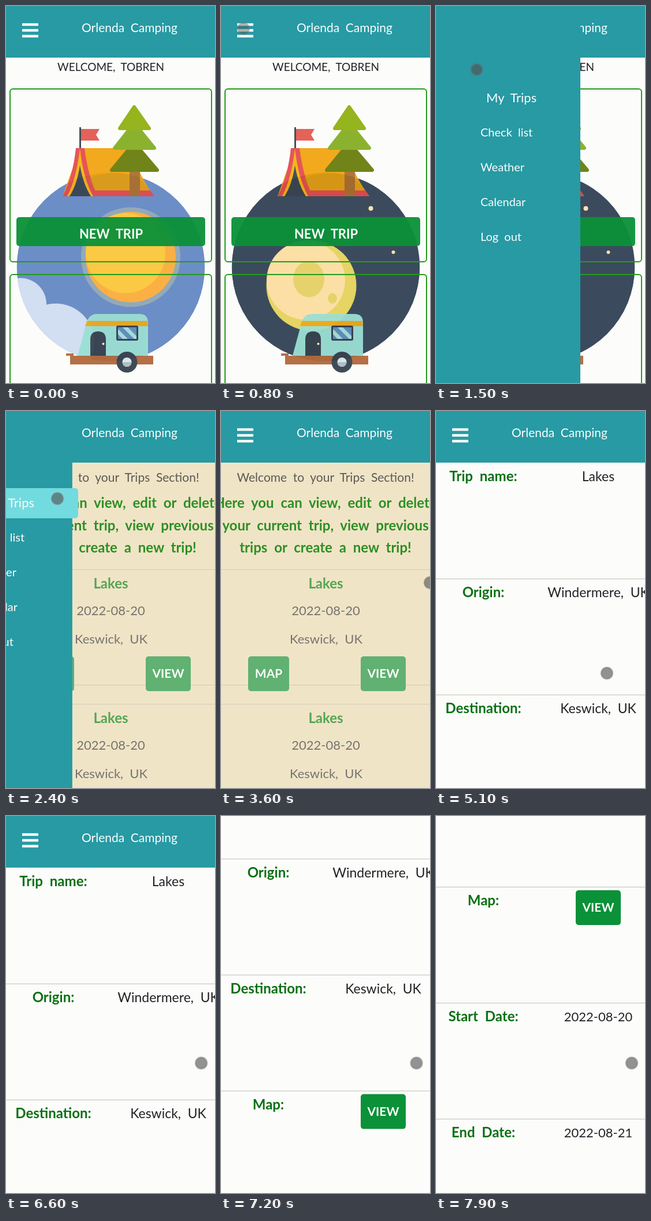
An HTML page for the animation above (8 s loop, 362 by 650 pixels).

```html
<!DOCTYPE html>
<html lang="en">
<head>
<meta charset="utf-8">
<title>Camping planner</title>
<style>
html, body { margin: 0; width: 100%; height: 100%; overflow: hidden; background: #fcfcfb; }
svg { display: block; width: 362px; height: 650px; }
text { font: 22px Lato, "Open Sans", sans-serif; word-spacing: .25em; text-anchor: middle; }
.bold { font-weight: 700; font-size: 24px; }
.label { fill: #0a7012; }
.value { font-size: 23px; fill: #222226; }
.button { font-weight: 700; font-size: 21px; fill: #fcfcfb; }
.side text { text-anchor: start; font-size: 20px; fill: #fcfcfb; }
.side .shift text { font-size: 22px; }

.anim, .anim * { animation: 8s linear infinite; }
.home { animation-name: home; }
.trips { animation-name: trips; }
.detail { animation-name: detail; }
.scroll { animation-name: scroll; }
.side { animation-name: side; }
.hover { animation-name: hover; }
.shift { animation-name: shift; }
.sky { animation-name: sky; }
.orb { animation-name: orb; }
.day { animation-name: day; }
.night { animation-name: night; }
.cloud { animation-name: cloud; }
.pointer { animation-name: move; }
.dot { animation-name: dot; }

/* Pages switch without a fade */
@keyframes home { 0%, 26.24% { visibility: visible } 26.25%, 100% { visibility: hidden } }
@keyframes trips { 0%, 26.24% { visibility: hidden } 26.25%, 58.74% { visibility: visible } 58.75%, 100% { visibility: hidden } }
@keyframes detail { 0%, 58.74% { visibility: hidden } 58.75%, 100% { visibility: visible } }
@keyframes scroll {
  0%, 84% { transform: none; animation-timing-function: ease-in-out }
  98%, 100% { transform: translateY(-567px) }
}
@keyframes side {
  0%, 12.5% { transform: translateX(-270px); animation-timing-function: ease-out }
  17.5%, 27.5% { transform: none; animation-timing-function: ease-in }
  30% { transform: translateX(-134px); animation-timing-function: ease-out }
  32.5%, 100% { transform: translateX(-270px) }
}
@keyframes hover { 0%, 21% { opacity: 0 } 23%, 100% { opacity: 1 } }
@keyframes shift { 0%, 21% { transform: none } 23%, 100% { transform: translateX(10px) } }
@keyframes sky { 0%, 1.25% { fill: #6c8ec6 } 8.75%, 100% { fill: #3b4b5d } }
@keyframes orb {
  0%, 1.25% { transform: translate(60px, -49px); animation-timing-function: ease-in-out }
  9%, 100% { transform: none }
}
@keyframes day { 0%, 2.5% { opacity: 1 } 8%, 100% { opacity: 0 } }
@keyframes night { 0%, 2.5% { opacity: 0 } 8%, 100% { opacity: 1 } }
@keyframes cloud {
  0% { transform: none; animation-timing-function: ease-in }
  8%, 100% { transform: translate(-150px, 40px) }
}
@keyframes move {
  0%, 13% { transform: translate(39px, 39px); animation-timing-function: ease-in-out }
  23%, 32.5% { transform: translate(89px, 151px); animation-timing-function: ease-in-out }
  45% { transform: translate(362px, 296px); animation-timing-function: ease-in-out }
  54%, 59% { transform: translate(283px, 452px) }
  63.75%, 67% { transform: translate(296px, 452px); animation-timing-function: ease-in-out }
  80% { transform: translate(338px, 426px) }
  100% { transform: translate(339px, 426px) }
}
@keyframes dot { 0%, 7% { opacity: 0 } 10% { opacity: .7 } 12%, 100% { opacity: 1 } }
</style>
</head>
<body>
<svg class="anim" viewBox="0 0 362 650">
  <defs>
    <clipPath id="disc"><circle cx="181.500" cy="450" r="163"/></clipPath>
    <g id="trip">
      <text class="bold" x="181.500" y="306" fill="#54a554">Lakes</text>
      <g fill="#747470">
        <text x="181.500" y="352">2022-08-20</text>
        <text x="182" y="401">Keswick, UK</text>
      </g>
    </g>
    <rect id="view" x="242" width="78" height="60" rx="5"/>
  </defs>

  <g class="home">
    <rect width="362" height="650" fill="#fcfcfb"/>
    <text x="181.500" y="112" style="font-size:19px" fill="#222226">WELCOME, TOBREN</text>

    <g clip-path="url(#disc)">
      <circle class="sky" cx="181.500" cy="450" r="163"/>
      <g class="night" fill="#fbe3ae">
        <circle cx="259.500" cy="349" r="4"/>
        <circle cx="298.500" cy="424.500" r="3"/>
      </g>
      <g class="orb">
        <g class="day">
          <circle cx="156" cy="482" r="86" fill="#94a9b8"/>
          <circle cx="156" cy="482" r="78" fill="#fbb044"/>
          <circle cx="147" cy="475" r="69" fill="#fbc943"/>
        </g>
        <g class="night">
          <circle cx="156.500" cy="482" r="78" fill="#e6d463"/>
          <circle cx="147" cy="473" r="68" fill="#fbdfa5"/>
          <ellipse cx="152" cy="471" rx="27" ry="31" fill="#e6d26c"/>
          <ellipse cx="193" cy="504" rx="8" ry="9" fill="#e6d26c"/>
        </g>
      </g>
      <g class="cloud">
        <circle cx="46" cy="526" r="24" fill="#9bd3f2"/>
        <g fill="#d2def1">
          <circle cx="25" cy="514" r="45"/>
          <circle cx="86" cy="580" r="67"/>
        </g>
      </g>
    </g>

    <!-- Tent and tree -->
    <g opacity=".93">
      <path d="M128.500 209V246" stroke="#36424c" stroke-width="3"/>
      <path d="M130 212H162L156 222L162 232H130Z" fill="#e4574c"/>
      <path d="M128 245H217Q228 290 257 328H98Z" fill="#f2a30c"/>
      <path d="M150 318H250L257 328H150Z" fill="#e34a4b"/>
      <path d="M121 245H136Q142 294 159 328H98Q116 294 121 245Z" fill="#e34a4b"/>
      <path d="M128 246Q134 298 151 328H106Q122 298 128 246Z" fill="#f5b20c"/>
      <path d="M128 275Q134 308 147 328H110Q123 308 128 275Z" fill="#38434f"/>
      <path d="M142 297Q182 282 228 293L250 318H154Z" fill="#b98a20" opacity=".3"/>
      <path d="M214 284H232V328H214Z" fill="#aa6d2c"/>
      <g stroke-width="6" stroke-linejoin="round">
        <path d="M222 236L262 283H183Z" fill="#677b08" stroke="#677b08"/>
        <path d="M222 202L257 245H188Z" fill="#83ad20" stroke="#83ad20"/>
        <path d="M222 174L248 211H197Z" fill="#8eaf0c" stroke="#8eaf0c"/>
      </g>
    </g>

    <!-- Camper -->
    <g opacity=".95">
      <path d="M104 599H117V603H255V618H111V603H104Z" fill="#b1693c"/>
      <path d="M124 603L140 544Q145 531 158 531H231Q246 531 246 546V603Z" fill="#9bdfd3"/>
      <path d="M140 543H245L246 552H137Z" fill="#efa81c"/>
      <path d="M146 603V575Q146 561 159.500 561T173 575V603Z" fill="#37424e"/>
      <circle cx="168.500" cy="582.500" r="2" fill="#fff2bc"/>
      <rect x="191" y="551" width="38" height="26" rx="3" fill="#37424e"/>
      <path d="M194 554H226V574H194Z" fill="#608fbd"/>
      <path d="M194 557L211 574H202L194 566ZM202 554H211L226 569V574H222Z" fill="#a9dfdc"/>
      <circle cx="209.500" cy="614" r="18" fill="#37424e"/>
      <circle cx="209.500" cy="614" r="8" fill="#dce8e8"/>
      <path d="M201.500 614a8 8 0 0 0 16 0Z" fill="#a9bdc4"/>
    </g>

    <g fill="none" stroke="#239b1c" stroke-width="2">
      <rect x="7" y="143" width="349" height="298" rx="5"/>
      <rect x="7" y="463" width="349" height="298" rx="5"/>
    </g>
    <rect x="18" y="364" width="327" height="50" rx="5" fill="#0b9138" opacity=".95"/>
    <text class="button" x="182" y="401" style="font-size:22px">NEW TRIP</text>
  </g>

  <g class="trips">
    <rect width="362" height="650" fill="#f0e4c6"/>
    <text x="181" y="122" style="font-size:21px" fill="#5a5a55">Welcome to your Trips Section!</text>
    <g fill="#2b8f24">
      <text class="bold" x="181" y="167">Here you can view, edit or delete</text>
      <text class="bold" x="181" y="206">your current trip, view previous</text>
      <text class="bold" x="181" y="244">trips or create a new trip!</text>
    </g>
    <path d="M0 273.500H362M0 472.500H362M0 505.500H362" stroke="#d3c9b8"/>
    <use href="#trip"/>
    <use href="#trip" y="232"/>
    <g fill="#60b172">
      <rect x="47" y="423" width="71" height="60" rx="5"/>
      <use href="#view" y="423"/>
    </g>
    <text class="button" x="82.500" y="460">MAP</text>
    <text class="button" x="281" y="460">VIEW</text>
  </g>

  <g class="scroll">
    <g class="detail">
      <rect width="362" height="1300" fill="#fcfcfb"/>
      <path d="M0 289.500H362M0 489.500H362M0 689.500H362M0 889.500H362M0 1089.500H362" stroke="#c0c0b4"/>
      <g class="label">
        <text class="bold" x="82" y="121">Trip name:</text>
        <text class="bold" x="82" y="321">Origin:</text>
        <text class="bold" x="82" y="521">Destination:</text>
        <text class="bold" x="82" y="721">Map:</text>
        <text class="bold" x="82" y="921">Start Date:</text>
        <text class="bold" x="82" y="1121">End Date:</text>
      </g>
      <text class="value" x="281" y="121">Lakes</text>
      <text class="value" x="281" y="321">Windermere, UK</text>
      <text class="value" x="281" y="521">Keswick, UK</text>
      <use href="#view" y="695" fill="#0b9138"/>
      <text class="button" x="281" y="732">VIEW</text>
      <text class="value" x="281" y="921" style="font-size:22px">2022-08-20</text>
      <text class="value" x="281" y="1121" style="font-size:22px">2022-08-21</text>
    </g>
    <rect width="362" height="89" fill="#279aa4"/>
    <path d="M28 32H56M28 42H56M28 52H56" stroke="#fcfcfb" stroke-width="4.500"/>
    <text x="214" y="45" style="font-size:21px" fill="#fcfcfb">Orlenda Camping</text>
  </g>

  <g class="side">
    <rect x="-20" width="270" height="650" fill="#279aa4"/>
    <g class="shift">
      <rect class="hover" x="-20" y="133" width="270" height="52" rx="5" fill="#72dbdf"/>
      <text x="87" y="166">My Trips</text>
    </g>
    <text x="77" y="225">Check list</text>
    <text x="77" y="285">Weather</text>
    <text x="77" y="345">Calendar</text>
    <text x="77" y="405">Log out</text>
  </g>

  <g class="pointer">
    <circle class="dot" r="10" fill="#505050" fill-opacity=".62" stroke="#707070" stroke-opacity=".45" stroke-width="2.500"/>
  </g>
</svg>
</body>
</html>
```
